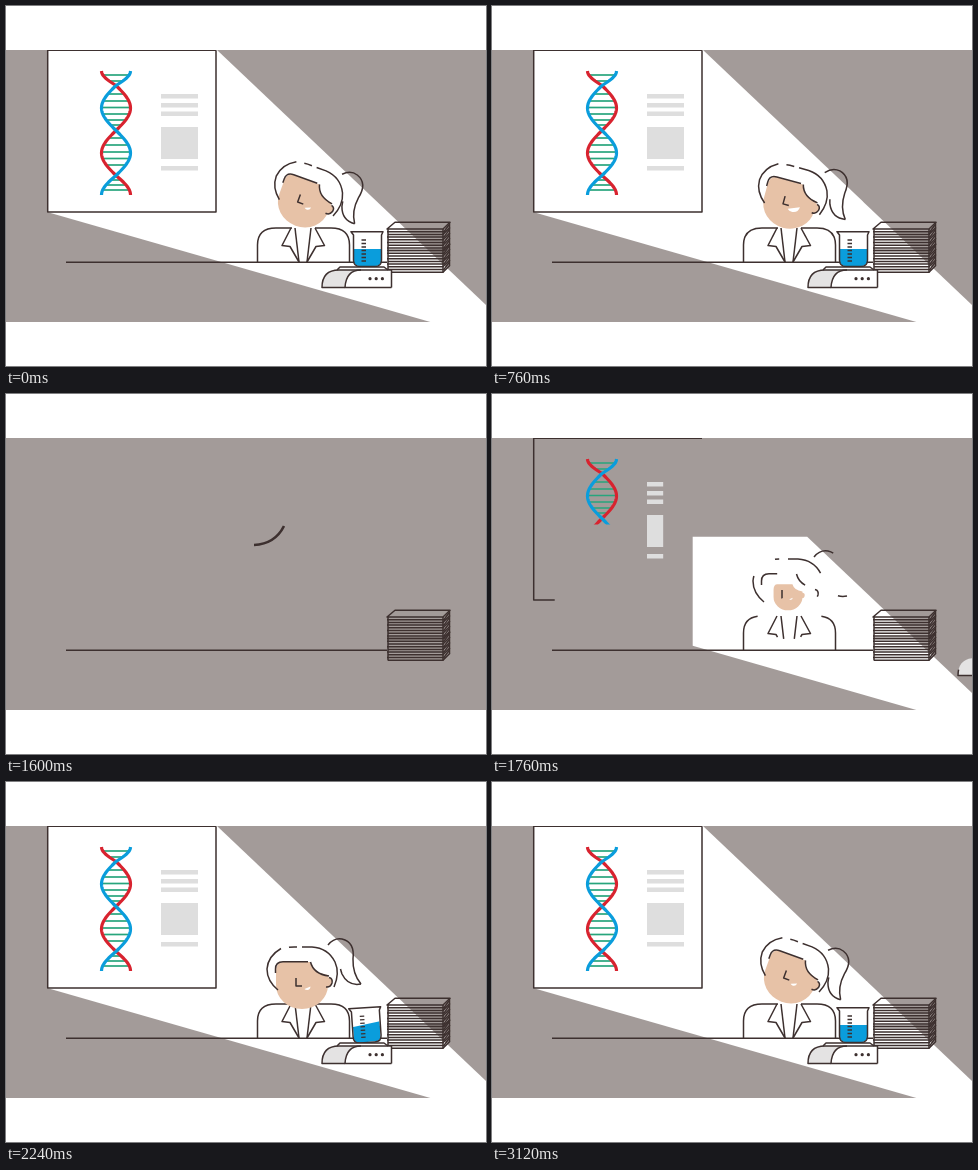
An HTML page for the animation above (3.16 s loop, 480 by 360 pixels).

```html
<!DOCTYPE html>
<html lang="en">
<head>
<meta charset="utf-8">
<title>Scientist at the desk</title>
<style>
html, body { margin: 0; width: 100%; height: 100%; overflow: hidden; background: #fff; }
svg { display: block; width: 100vw; height: 100vh; }
.ln { fill: none; stroke: #3d302f; stroke-width: 1.5; stroke-linejoin: round; }
.skin { fill: #e7c2a7; }
.bar { fill: #dedede; }
</style>
</head>
<body>
<svg viewBox="0 0 480 360">
  <defs>
    <clipPath id="band"><rect y="44" width="480" height="272"/></clipPath>
    <clipPath id="dnaClip"><rect id="dnaWin" x="85" y="63" width="50" height="127"/></clipPath>
    <clipPath id="glass"><path d="M348 226H375V254Q375 260 369 260H354Q348 260 348 254Z"/></clipPath>
  </defs>
  <g clip-path="url(#band)">
    <rect id="bg" y="44" width="480" height="272"/>
    <path id="beam" fill="#fff" d="M41 44H211L530 346.3L41 206Z"/>
    <g clip-path="url(#dnaClip)" id="dna" fill="none"></g>
    <g id="bars" class="bar">
      <rect x="155" y="88" width="37" height="4.5"/>
      <rect x="155" y="97" width="37" height="4.5"/>
      <rect x="155" y="105.5" width="37" height="4.5"/>
      <rect x="155" y="121" width="37" height="32"/>
      <rect x="155" y="160" width="37" height="4.5"/>
    </g>
    <path id="panel" class="ln" d="M210 44.3H41.7V206H210V44.3"/>
    <path id="desk" class="ln" d="M60 256.3H381"/>
    <g id="stack" class="ln" stroke-width="1.4"></g>
    <g id="body" class="ln">
      <path d="M251.5 256V239Q251.5 222 270 222H286"/>
      <path d="M343.5 256V239Q343.5 222 325 222H309"/>
      <path d="M285 222L276 239.5L284 240.5L293 256"/>
      <path d="M309 222L318.5 239.5L310 240.5L301 256"/>
      <path d="M289 222L293 256"/>
      <path d="M305 222L301 256"/>
    </g>
    <g id="head">
      <g id="face">
        <path class="skin" d="M270 190Q270 180 277 180H304Q307 191 322 193V203A26 24 0 0 1 270 203Z"/>
        <path class="skin" d="M321 195Q327 196 326 201Q325 206 320 205Z"/>
        <path id="smile" fill="#fff" d="M295.5 207.5L307.5 202.5Q307 209 301 209.5Q297 209.5 295.5 207.5Z"/>
      </g>
      <g id="hair" class="ln">
        <path d="M272 208Q261 199 261 187Q262 174 275 166.5"/>
        <path d="M283 165.3Q286 164.8 291 165"/>
        <path d="M296 165H306Q322 166 329 180Q334 191 328 205"/>
        <path d="M269.5 191V187Q269.5 179.7 277 179.7H302"/>
        <path d="M304.5 180Q307.5 192 323 194"/>
        <path d="M323 195.5Q327 196.5 326 201Q324.5 205.5 320 205"/>
        <path d="M290 196V204H296"/>
      </g>
      <g id="tail" class="ln">
        <path d="M322 163Q328 155.500 336 157Q349 160 347 177Q346.500 192 355 202"/>
        <path d="M355 202Q342 204.500 336 192Q335 189 334.500 187"/>
      </g>
    </g>
    <path id="arc" class="ln" stroke-linecap="butt" style="stroke-width:2.6" d="M248 151Q269 150 278 132"/>
    <g id="unit">
      <g id="beaker">
        <g clip-path="url(#glass)"><path id="water" fill="#0a9ddc" d="M320 243H402V300H320Z"/></g>
        <path class="ln" d="M345 225.700H377L375.500 229V254Q375.500 260.500 369 260.500H354Q347.500 260.500 347.500 254V229Z"/>
        <path class="ln" style="stroke-width:1.3" d="M355.500 234H360M355.500 237.500H360M355.500 241H360M355.500 244.500H360M355.500 248H360M355.500 251.500H360M355.500 255H360"/>
      </g>
      <g id="shell">
        <path d="M331 264L334 261H378L382 264Z" fill="#fff"/>
        <path d="M316 281.500Q316 264 333 264H352V281.500Z" fill="#e4e3e3"/>
        <path d="M339 281.500Q340 264 355 264H385.500V281.500Z" fill="#fff"/>
        <g fill="#3d302f"><circle cx="364" cy="272.700" r="1.600"/><circle cx="370.200" cy="272.700" r="1.600"/><circle cx="376.400" cy="272.700" r="1.600"/></g>
      </g>
      <g id="frame" class="ln">
        <path d="M331 264L334 261H378L382 264"/>
        <path d="M339 281.500H316Q316 264 333 264H355"/>
        <path d="M385.500 281.500V264H355Q340 264 339 281.500H385.500"/>
      </g>
    </g>
  </g>
</svg>
<script>
const LOOP = 3160, STEP = 40;
const $ = id => document.getElementById(id);
const add = (parent, d, attrs = {}) => {
  const p = document.createElementNS('http://www.w3.org/2000/svg', 'path');
  p.setAttribute('d', d);
  for (const k in attrs) p.setAttribute(k, attrs[k]);
  parent.append(p);
};
const put = (id, name, value) => $(id).setAttribute(name, value);

// Helix: the ends flare, the middle turns every 45 px.
const swing = y => 14.5 * (y < 79.5 ? Math.cos((y - 65) / 14.5 * Math.PI / 2)
  : y > 169.5 ? -Math.sin((y - 169.5) / 19.5 * Math.PI / 2)
  : -Math.sin((y - 79.5) / 45 * Math.PI));
const strand = side => {
  let d = '';
  for (let y = 65; y <= 189; y++) d += `${d ? 'L' : 'M'}${(110 + side * swing(y)).toFixed(2)} ${y}`;
  return d;
};
for (const y of [69, 75, 88, 95, 101.5, 108, 114, 119, 132, 139, 146, 152.5, 159, 174, 179, 184]) {
  const w = Math.abs(swing(y));
  add($('dna'), `M${110 - w} ${y}H${110 + w}`, { stroke: '#27a57c', 'stroke-width': 1.7 });
}
add($('dna'), strand(-1), { stroke: '#d8232f', 'stroke-width': 3.2 });
add($('dna'), strand(1), { stroke: '#0a9ddc', 'stroke-width': 3.2 });

// Paper pile
add($('stack'), 'M381 223L389 216.300H444L437 223Z');
for (let i = 1; i < 17; i++) {
  const y = 223 + i * 2.7, j = i % 2;
  add($('stack'), `M${382 - j} ${y}H${437 + j}L${444 - j} ${y - 7}`);
}
add($('stack'), 'M381 244.500H438L444 237.500');
add($('stack'), 'M382 223V266.500M437 223V266.500M443.500 216V259.500');

const clamp = x => Math.max(0, Math.min(1, x));
const span = (t, a, b) => clamp((t - a) / (b - a));
const easeIn = p => p ** 3;
const easeOut = p => 1 - (1 - p) ** 2;

// Smooth value from [time, value] steps
const at = (keys, t) => {
  if (t <= keys[0][0]) return keys[0][1];
  for (let i = 1; i < keys.length; i++) {
    const [a, u] = keys[i - 1], [b, v] = keys[i];
    if (t <= b) {
      const p = (t - a) / (b - a);
      return u + (v - u) * p * p * (3 - 2 * p);
    }
  }
  return keys[keys.length - 1][1];
};

const tilt = [[0, 20], [560, 15.800], [880, 15], [1480, 15], [1520, 0], [2360, 0], [2900, 18.500], [3120, 20]];
const sway = [[0, 6], [880, 1], [1520, 0], [2360, 0], [2600, -2], [3120, 6]];
const grin = [[0, .5], [360, .6], [880, 1], [1480, 1], [1520, .5]];
const rock = [[1480, 0], [1520, 24], [1760, 24], [1960, 15], [2160, -7], [2400, 5], [2600, 4], [2800, -2], [3000, 1], [3120, 0]];
const slosh = [[1480, 0], [1960, -5], [2160, -16], [2400, 14], [2600, 11], [2800, -7], [3000, 3], [3120, 0]];
const rise = [[1480, 0], [1760, 8], [1960, 8], [2300, 0]];

// Parts drawn with a travelling stroke: id, start and end of drawing
const strokes = [['panel', 1640, 2020], ['desk', 1440, 1590], ['stack', 1420, 1590],
  ['body', 1640, 1920], ['hair', 1660, 1940], ['tail', 1720, 1950], ['frame', 1720, 1900]];
const parts = strokes.map(([id, a, b]) => {
  const paths = $(id).tagName === 'path' ? [$(id)] : [...$(id).children];
  paths.forEach(p => p.setAttribute('pathLength', 1));
  return { paths, a, b };
});

// Visible stretch of a part: it is wiped from its start, then drawn again.
const reach = (t, a, b) => t < Math.min(a, 1440)
  ? [easeIn(span(t, 1240, 1440)), 1]
  : [0, easeOut(span(t, a, b))];

const trim = (p, [from, to]) => {
  const full = from <= 0 && to >= 1;
  p.style.strokeDasharray = full ? 'none' : `0 ${from} ${Math.max(0, to - from)} 2`;
  p.style.visibility = to - from > .001 ? 'visible' : 'hidden';
};

const mix = (a, b, p) => `rgb(${a.map((v, i) => Math.round(v + (b[i] - v) * p))})`;

function draw(t) {
  const tint = t < 1280 ? 0 : 1 - span(t, 1320, 1440);
  put('bg', 'fill', mix([163, 155, 153], [174, 166, 170], tint));

  const light = t < 1520 ? 1 - easeIn(span(t, 1280, 1480)) : easeOut(span(t, 1640, 1920));
  put('beam', 'transform', `translate(530 346.3) scale(${light}) translate(-530 -346.3)`);

  for (const { paths, a, b } of parts) {
    const r = reach(t, a, b);
    paths.forEach(p => trim(p, r));
  }

  const [from, to] = reach(t, 1640, 2020);
  put('dnaWin', 'y', 63 + 127 * from);
  put('dnaWin', 'height', 127 * Math.max(0, to - from));
  const wide = t < 1520 ? 1 - from : easeOut(span(t, 1700, 1940));
  put('bars', 'transform', `translate(155 0) scale(${wide} 1) translate(-155 0)`);

  put('head', 'transform', `rotate(${at(tilt, t)} 313.4 204.7)`);
  put('tail', 'transform', `rotate(${at(sway, t)} 325 165)`);
  put('smile', 'transform', `translate(301.5 206.5) scale(${at(grin, t)}) translate(-301.5 -206.5)`);
  const grow = t < 1520 ? 1 - easeIn(span(t, 1240, 1440)) : easeOut(span(t, 1700, 1880));
  put('face', 'transform', `translate(296 203) scale(${grow}) translate(-296 -203)`);

  const fly = span(t, 1600, 1720);
  $('arc').style.visibility = t >= 1560 && t < 1720 ? 'visible' : 'hidden';
  put('arc', 'transform', `translate(${fly * 36} ${fly * 42})`);

  const slide = t < 1480 ? 0 : 150 * (1 - span(t, 1760, 2240)) ** 3;
  put('unit', 'transform', `translate(${slide} 0)`);
  const solid = t < 1480 ? 1 - easeIn(span(t, 1240, 1440)) : +(t >= 1760);
  put('shell', 'opacity', solid);
  put('beaker', 'opacity', solid);
  put('beaker', 'transform', `rotate(${at(rock, t)} 361 260)`);
  put('water', 'transform', `translate(0 ${-at(rise, t)}) rotate(${at(slosh, t)} 361 243)`);
}

const start = performance.now();
function tick() {
  const t = (performance.now() - start) % LOOP;
  draw(Math.floor(t / STEP) * STEP);
  requestAnimationFrame(tick);
}
tick();
</script>
</body>
</html>
```
